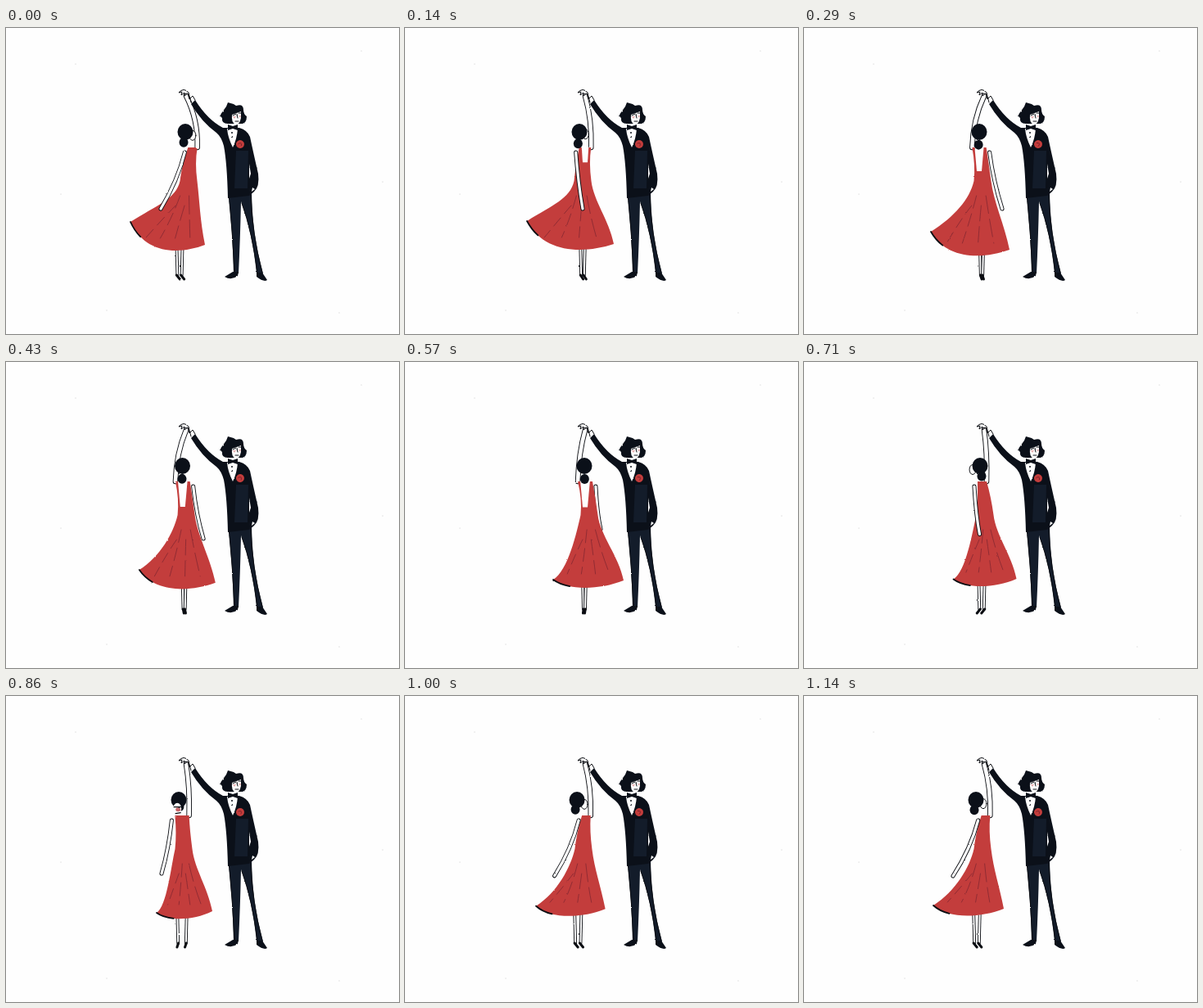
An HTML page for the animation above (1280 ms loop, 480 by 374 pixels).

```html
<!DOCTYPE html>
<html lang="en">
<head>
<meta charset="utf-8">
<title>Dancing couple</title>
<style>
  html, body { margin: 0; width: 100%; height: 100%; overflow: hidden; background: #fefefe; }
  svg { display: block; width: 100vw; height: 100vh; }
  .line { fill: none; stroke: #0b0d12; stroke-width: 1; stroke-linecap: round; stroke-linejoin: round; }
  .ink { fill: #0b1019; }
  .navy { fill: #131c2a; }
  .red { fill: #c33d3c; }
  .skin { fill: #fefefe; }
</style>
</head>
<body>
<svg viewBox="0 0 480 374">
  <defs>
    <filter id="brush" filterUnits="userSpaceOnUse" x="0" y="0" width="480" height="374" color-interpolation-filters="sRGB">
      <feTurbulence type="fractalNoise" baseFrequency=".2" numOctaves="2" seed="4"/>
      <feDisplacementMap in="SourceGraphic" scale="1.6" xChannelSelector="R" yChannelSelector="G"/>
    </filter>
  </defs>
  <g id="specks" fill="#ccc"></g>
  <g filter="url(#brush)">
    <g id="woman"></g>
    <g id="man">
      <!-- trousers and shoes -->
      <path class="navy" d="M271 196H300Q300 250 314 300H306Q301 250 287 212Q286 260 284 300H278Q277 250 271 196Z"/>
      <path class="line" d="M272 202Q277 250 279 298M299 204Q300 250 313 299M288 214Q301 250 307 299"/>
      <path class="ink" d="M277 298H284L283 303Q275 309 267 304ZM306 299H313L319 308Q315 311 306 304Z"/>
      <!-- jacket and sleeves -->
      <path class="ink" d="M226 93L231 88Q246 112 265 122H285Q295 125 298 133Q302 152 308 178Q310 194 303 200L297 205L271 208Q270 165 266 144Q263 133 257 128Q239 115 226 93Z"/>
      <path class="navy" d="M281 150H296L295 196H279Z"/>
      <path class="skin" d="M270 123H283Q282 136 277 146Q271 134 270 123ZM301 195L304 197L300 200ZM297 166L299 178L297 184Z"/>
      <path class="ink" d="M271 118L277 120L283 118V125L277 123L271 125Z"/>
      <circle class="ink" cx="276" cy="128" r="1"/><circle class="ink" cx="276" cy="133" r="1"/>
      <!-- head -->
      <path class="ink" d="M269 96L271 91L278 93L281 95Q290 92 290 100Q290 105 294 108Q294 117 287 117H271Q263 117 264 110Q260 107 264 103Z"/>
      <path class="skin" d="M276 106L287 102V110Q285 119 280 118Q275 115 276 106Z"/>
      <path class="line" d="M277 107L281 105M284 104H287M282 106L283 110M280 114H284"/>
      <path fill="#dd8d90" d="M277 108H281L279 111ZM284 107H287L286 110Z" opacity=".7"/>
      <!-- joined hands -->
      <path class="line" d="M226 91L223 79Q217 72 211 79L215 78L214 82L218 79V83L222 80L224 87L228 83L231 88"/>
    </g>
    <g id="rose"></g>
  </g>
</svg>
<script>
const LOOP = 1280;
const starts = [0, 140, 290, 430, 570, 710, 860, 1000, 1140];

// turn is in degrees: 0 shows her back, 90 faces right, 180 faces us.
// tip and heel are the two ends of the hem; hand is the free hand.
const pose = (turn, head, neck, waist, foot, tip, heel, hand) =>
  ({ turn, head, neck, waist, foot, tip, heel, hand });
const side = pose(80, 219, 228, 223, 212, [152, 237], [243, 265], [189, 221]);
const away = pose(55, 213, 220, 217, 217, [149, 236], [255, 264], [217, 221]);
const backLeft = pose(25, 214, 214, 218, 217, [155, 249], [251, 271], [242, 221]);
const back = pose(-10, 219, 220, 225, 219, [181, 266], [267, 267], [239, 204]);
const front = pose(-155, 211, 215, 217, 215, [184, 265], [252, 263], [190, 217]);
const returning = pose(-275, 210, 222, 218, 211, [158, 256], [244, 260], [182, 220]);

const lerp = (a, b, t) => Array.isArray(a) ? a.map((v, i) => lerp(v, b[i], t)) : a + (b - a) * t;
const mix = (a, b, t) =>
  Object.fromEntries(Object.keys(a).map(key => [key, lerp(a[key], b[key], t)]));

const poses = [
  side, away, backLeft, mix(backLeft, back, .3), back,
  mix(back, front, .5), front, mix(front, returning, .92), returning
];

const NECK_Y = 146, WAIST_Y = 187, HEAD_Y = 128, FOOT_Y = 305;
const GRIP = [220, 83];

const path = (d, cls, style = '') => `<path class="${cls}" d="${d}" style="${style}"/>`;
const stroke = (d, width, color = '#0b0d12', more = '') =>
  path(d, 'line', `stroke:${color};stroke-width:${width};${more}`);
const limb = (d, width) => stroke(d, width) + stroke(d, width - 1.8, '#fefefe');
const oval = (x, y, rx, ry, cls, style = '') =>
  `<ellipse class="${cls}" cx="${x}" cy="${y}" rx="${rx}" ry="${ry}" style="${style}"/>`;

function drawDress({ neck, waist, tip, heel }, half, open) {
  const [left, right] = [waist - 10.5, waist + 10.5];
  const span = left - tip[0], width = heel[0] - tip[0], low = heel[1] + 12;
  const hem = `C${tip[0] + width * .2} ${low} ${tip[0] + width * .65} ${low} ${heel}`;
  let art = path(`M${neck - half} ${NECK_Y}Q${left + 2} 168 ${left} ${WAIST_Y}` +
    `C${left - 5} ${WAIST_Y + 22} ${tip[0] + span * .55} ${tip[1] - span * .35} ${tip}${hem}` +
    `C${heel[0] - 6} ${heel[1] - 30} ${right + 3} ${WAIST_Y + 25} ${right} ${WAIST_Y}` +
    `Q${right - 3} 165 ${neck + half} ${NECK_Y}Z`, 'red');

  for (let k = 1; k <= 4; k++) {
    const x = tip[0] + width * k / 5;
    const top = waist + (x - waist) * .3;
    art += stroke(`M${top} ${WAIST_Y + 18 + k % 2 * 12}Q${lerp(top, x, .4)} 232 ${x} ${heel[1] - 8}`,
      .8, '#852832', `stroke-dasharray:${10 + k * 3} 7`);
  }
  art += stroke(`M${tip}${hem}`, 1.8, '#0b0d12', 'stroke-dasharray:22 300');

  if (open > .4) {
    art += path(`M${neck - half + 3} ${NECK_Y - 1}H${neck + half - 3}` +
      `L${neck + 3} ${NECK_Y + 32 * open}H${neck - 3}Z`, 'skin');
  }
  return art;
}

function drawHead({ head }, sin, cos) {
  const x = head + 9 * sin, y = HEAD_Y + 4 - 4 * cos;
  const face = oval(x, y, 4, 6, 'line', 'fill:#fefefe');
  const hair = oval(head, HEAD_Y - 1, 9.5, 10, 'ink') +
    oval(head - 2 * sin, HEAD_Y + 11 + 4 * cos, 5.5, 6, 'ink');
  if (cos > -.4) return face + hair;
  return hair + oval(x + 2, y + 2, 5, 7, 'skin') + oval(x + 3, y + 3, 3, 2.5, '', 'fill:#c9666a') +
    stroke(`M${x - 2} ${y}H${x + 7}M${x} ${y + 8}L${x + 6} ${y + 7}`, 1.4);
}

function drawWoman(p) {
  const angle = p.turn * Math.PI / 180;
  const sin = Math.sin(angle), cos = Math.cos(angle);
  const half = 5 + 4 * Math.abs(cos);
  const armSide = p.hand[0] > p.neck + 5 ? 1 : -1;
  const shoulder = p.neck + armSide * (half + 4);
  const lifted = p.neck - armSide * half;

  const legs = [-1, 1].map(s => {
    const x = p.foot + s * (3 - 2 * cos);
    return limb(`M${x + s} 262L${x} ${FOOT_Y - 3}`, 3.8) +
      stroke(`M${x - sin} ${FOOT_Y - 3}L${x + 3 * sin} ${FOOT_Y + 2}`, 3);
  }).join('');
  const raised = limb(`M${lifted} ${NECK_Y}Q${lifted + 1} 112 ${GRIP}`, 6.5);
  const freeArm = limb(`M${shoulder} 152Q${lerp(shoulder, p.hand[0], .3)} 187 ${p.hand}`, 5);
  const dress = drawDress(p, half, cos);

  return legs + raised + (armSide > 0 ? freeArm + dress : dress + freeArm) + drawHead(p, sin, cos);
}

function drawRose(index) {
  const tilt = (index * 2 % 5 - 2) * 8;
  return `<g transform="rotate(${tilt} 286 142)">` + oval(286, 142, 5, 5, 'red') +
    stroke('M284 141Q289 139 287 144', .8, '#6f1e29') + '</g>';
}

const byId = id => document.getElementById(id);
const specks = [[434, 28], [85, 44], [460, 188], [67, 203], [123, 345], [407, 348]];
byId('specks').innerHTML = specks.map(([x, y]) => oval(x, y, .7, .5, '')).join('');

let shown = -1;
function render(time) {
  const index = starts.findLastIndex(start => start <= time % LOOP);
  if (index === shown) return;
  shown = index;
  byId('woman').innerHTML = drawWoman(poses[index]);
  byId('rose').innerHTML = drawRose(index);
}

const begin = performance.now();
function tick() {
  render(performance.now() - begin);
  requestAnimationFrame(tick);
}
tick();
</script>
</body>
</html>
```
